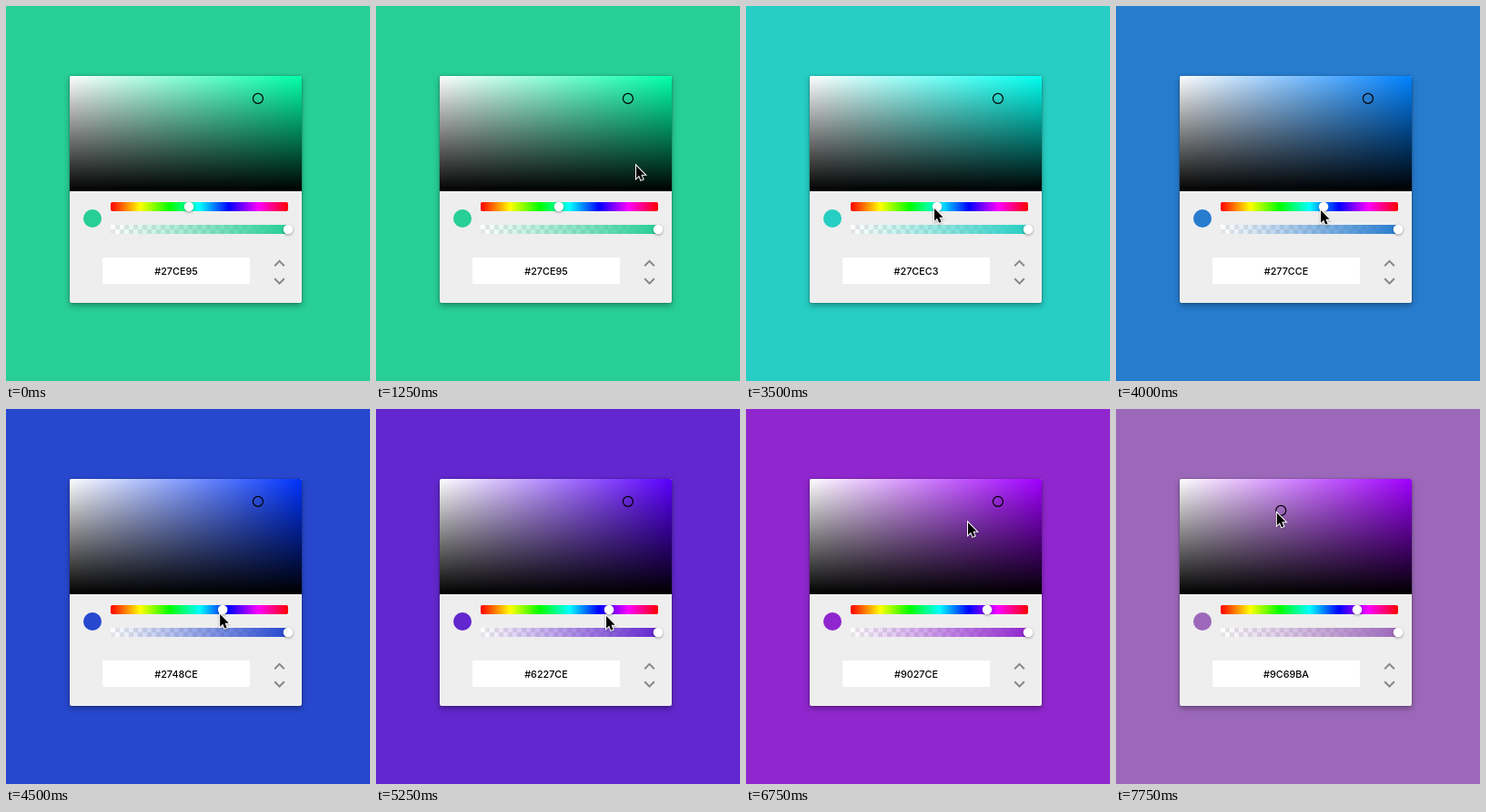
Recreate the animation shown at these times as an HTML page. Size 400x413 px, loop 8000 ms.

```html
<!DOCTYPE html>
<html lang="en">
<head>
<meta charset="utf-8">
<title>Colour picker</title>
<style>
  html, body { margin: 0; width: 100%; height: 100%; overflow: hidden; }
  svg { display: block; width: 400px; height: 413px; }
  .panel { filter: drop-shadow(0 0 1px rgba(0,0,0,.3)) drop-shadow(0 3px 3px rgba(0,0,0,.3)); }
  .thumb { fill: #fff; filter: drop-shadow(0 1px 1.5px rgba(0,0,0,.37)); }
  .arrow { fill: #868686; }
  text { font: 500 10.8px Inter, Roboto, sans-serif; text-anchor: middle; fill: #000; }
  #cursor { filter: drop-shadow(0 1px 1px rgba(0,0,0,.3)); }
</style>
</head>
<body>
<svg viewBox="0 0 400 413">
  <defs>
    <linearGradient id="white">
      <stop stop-color="#fff"/><stop offset="1" stop-color="#fff" stop-opacity="0"/>
    </linearGradient>
    <linearGradient id="black" x2="0" y2="1">
      <stop stop-opacity="0"/><stop offset="1"/>
    </linearGradient>
    <linearGradient id="rainbow"></linearGradient>
    <linearGradient id="fade">
      <stop class="tint" stop-opacity="0"/><stop class="tint" offset="1"/>
    </linearGradient>
    <pattern id="checks" x="115" y="241" width="10" height="10" patternUnits="userSpaceOnUse">
      <path fill="#e6e6e6" d="M0 0h10v10H0z"/>
      <path fill="#fff" d="M0 0h5v5H0zM5 5h5v5H5z"/>
    </pattern>
    <clipPath id="corners"><rect x="70" y="77" width="255" height="250" rx="2"/></clipPath>
  </defs>

  <rect id="stage" width="400" height="413"/>
  <rect class="panel" x="70" y="77" width="255" height="250" rx="2" fill="#eee"/>
  <g clip-path="url(#corners)">
    <rect id="field" x="70" y="77" width="255" height="127"/>
    <rect x="70" y="77" width="255" height="127" fill="url(#white)"/>
    <rect x="70" y="77" width="255" height="127" fill="url(#black)"/>
  </g>
  <circle id="ring" r="5.5" fill="none" stroke="#000" stroke-width="1.2"/>

  <circle id="swatch" cx="95" cy="234" r="10"/>
  <rect x="115" y="216" width="195" height="10" rx="2" fill="url(#rainbow)"/>
  <rect x="115" y="241" width="195" height="10" fill="url(#checks)"/>
  <rect x="115" y="241" width="195" height="10" fill="url(#fade)"/>
  <circle id="hueThumb" class="thumb" cy="221" r="5.3"/>
  <circle class="thumb" cx="310" cy="246" r="5.3"/>

  <rect x="106" y="277" width="162" height="29" fill="#fff"/>
  <text id="hex" x="187" y="296"></text>
  <path class="arrow" d="M295.9 286.9l4.6-4.6 4.6 4.6 1.4-1.4-6-6-6 6z"/>
  <path class="arrow" d="M295.9 299.6l4.6 4.6 4.6-4.6 1.4 1.4-6 6-6-6z"/>

  <path id="cursor" d="M0 0V13.7L3.1 10.8 5.2 15.7 7.5 14.7 5.4 9.8H9.6Z"
        stroke="#fff" stroke-width="2" paint-order="stroke"/>
</svg>
<script>
const LOOP = 8000, STEP = 250;
const HUE_START = 159.5, HUE_END = 277.7;
const $ = id => document.getElementById(id);
const lerp = (a, b, u) => a + (b - a) * u;
const progress = (t, from, to) => Math.max(0, Math.min(1, (t - from) / (to - from)));

// Linear path through [ms, ...values] points.
function follow(points, t) {
  const i = Math.max(1, points.findIndex(p => p[0] >= t));
  const [a, b] = t >= points.at(-1)[0] ? points.slice(-2) : [points[i - 1], points[i]];
  const u = progress(t, a[0], b[0]);
  return a.slice(1).map((value, k) => lerp(value, b[k + 1], u));
}

const hueDrag = [[3250, HUE_START], [4000, 209.5], [4500, 228.1], [5250, 261.2], [5750, HUE_END]];
const toSlider = [[2000, 286, 176], [2250, 223, 230.5], [2500, 208, 229], [2750, 198.4, 222]];
const toField = [[6000, 262, 229], [6250, 261.5, 200], [6500, 253, 129], [6750, 244, 125]];

function shadeAt(t) {
  if (t < 7000) return [167 / 206, 206 / 255];
  const u = progress(t, 7250, 7750) ** 3;
  return [lerp(.682, 81 / 186, u), lerp(.65, 186 / 255, u)];
}

function pointerAt(t, h, thumbX, ring) {
  if (t < 1250) return [-50, -50];
  if (t <= 2750) return follow(toSlider, t);
  if (t < 6000) return [thumbX - 3, lerp(222, 229, (h - HUE_START) / (HUE_END - HUE_START))];
  if (t < 7000) return follow(toField, t);
  return [ring[0] - 4.4, ring[1] + 2.6];
}

function toHex(h, s, v) {
  const channel = n => {
    const k = (n + h / 60) % 6;
    const value = v * (1 - s * Math.max(0, Math.min(k, 4 - k, 1)));
    return Math.round(value * 255).toString(16).padStart(2, "0");
  };
  return ("#" + channel(5) + channel(3) + channel(1)).toUpperCase();
}

function place(el, [x, y]) {
  el.setAttribute("transform", `translate(${x} ${y})`);
}

$("rainbow").innerHTML = Array.from({ length: 7 }, (_, i) =>
  `<stop offset="${i / 6}" stop-color="${toHex(i * 60, 1, 1)}"/>`).join("");

function draw(time) {
  const t = Math.floor(time / STEP) * STEP;
  const [h] = follow(hueDrag, t);
  const [s, v] = shadeAt(t);
  const color = toHex(h, s, v);
  const thumbX = 114.6 + 195 * h / 360;
  const ring = [70.2 + 255 * s, 77.5 + 127 * (1 - v)];

  $("stage").setAttribute("fill", color);
  $("swatch").setAttribute("fill", color);
  $("field").setAttribute("fill", toHex(h, 1, 1));
  document.querySelectorAll(".tint").forEach(el => el.setAttribute("stop-color", color));
  $("hex").textContent = color;
  $("hueThumb").setAttribute("cx", thumbX);
  place($("ring"), ring);
  place($("cursor"), pointerAt(t, h, thumbX, ring));
}

const start = performance.now();
function tick() {
  draw((performance.now() - start) % LOOP);
  requestAnimationFrame(tick);
}
tick();
</script>
</body>
</html>
```
